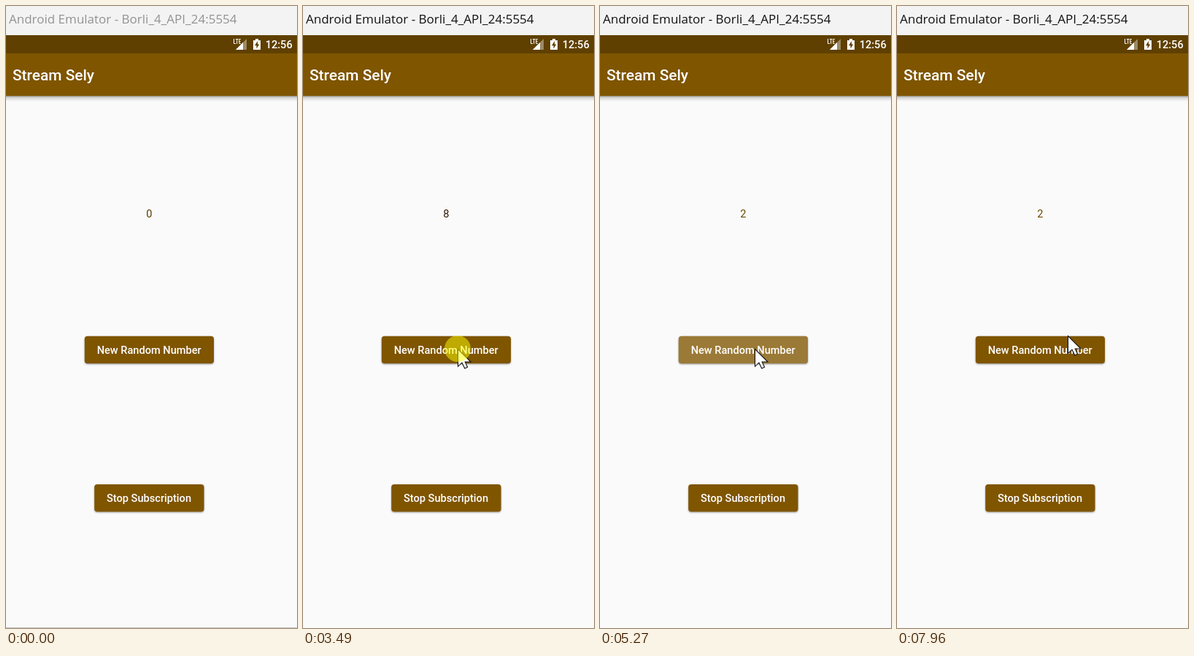
Recreate the animation shown at these times as an HTML page. Size 399 by 853 pixels, loop 8000 ms.

```html
<!DOCTYPE html>
<html lang="en">
<head>
<meta charset="utf-8">
<style>
  html, body { margin: 0; width: 100%; height: 100%; overflow: hidden; background: #fafafa; }
  svg { display: block; width: 100vw; height: 100vh; font-family: Roboto, sans-serif; }
  .label { font-size: 14.6px; font-weight: 500; fill: #fff; text-anchor: middle; }
  .button { fill: #7f5500; filter: drop-shadow(0 1.5px 1.3px rgba(0, 0, 0, .4)); }
</style>
</head>
<body>
<svg viewBox="0 0 399 853">
  <defs>
    <linearGradient id="shade" x2="0" y2="1">
      <stop stop-color="#000" stop-opacity=".36"/>
      <stop offset=".4" stop-color="#000" stop-opacity=".13"/>
      <stop offset="1" stop-color="#000" stop-opacity="0"/>
    </linearGradient>
  </defs>
  <rect width="399" height="853" fill="#fafafa"/>
  <rect id="edge" y="852" width="399" height="1" fill="#c4c4c4"/>

  <rect width="399" height="40" fill="#f3f3f3"/>
  <text id="title" x="4" y="24" font-size="17" font-family="Open Sans, sans-serif">Android Emulator - Borli_4_API_24:5554</text>

  <rect y="40" width="399" height="25" fill="#5f4000"/>
  <path d="M330 45V60H315Z" fill="#9d8b66"/>
  <path d="M325 50V60H315Z" fill="#fff"/>
  <path d="M312.5 45V51.5H315M314.8 45.5H318.6M316.7 45.5V52M321.8 45.5H319.8V51.5H321.8M319.8 48.5H321.5" fill="none" stroke="#fff"/>
  <path d="M339 47H342V45H346V47H349V60H339Z" fill="#fff"/>
  <path d="M345 48L341 54.3H343.5V58.5L347.3 52.4H345Z" fill="#5f4000"/>
  <text class="label" x="374.2" y="58">12:56</text>

  <rect y="123" width="399" height="8" fill="url(#shade)"/>
  <rect y="65" width="399" height="58.4" fill="#7f5500"/>
  <text x="9" y="102" font-size="20.9" font-weight="500" fill="#fff">Stream Sely</text>

  <text id="number" x="196.3" y="290" font-size="14.6" text-anchor="middle"></text>

  <rect class="button" x="107.8" y="452.8" width="177.2" height="37.4" rx="4"/>
  <rect id="flashNew" x="107.8" y="452.8" width="177.2" height="37.4" rx="4" fill="#fff"/>
  <text class="label" x="196.2" y="477">New Random Number</text>

  <rect class="button" x="121.2" y="656" width="150.3" height="37.6" rx="4"/>
  <rect id="flashStop" x="121.2" y="656" width="150.3" height="37.6" rx="4" fill="#fff"/>
  <text class="label" x="196" y="680">Stop Subscription</text>

  <path id="resize" d="M370 667.5L377 661V666H391V661L398 667.5L391 674V669H377V674Z" fill="#fff" stroke="#000"/>
  <path id="cursor" d="M.5 .5V24.3L6 19.2L9.8 27L13.6 25.3L10.2 18H18Z" fill="#fff" stroke="#111" stroke-width="1.1"/>
  <circle id="press" r="18" fill="#ff0" fill-opacity=".5"/>
</svg>
<script>
const $ = id => document.getElementById(id);
const LOOP = 8000, ENTER = 1260, FOCUS = 2080, HOLD = 130;

const moves = [
  { from: ENTER, to: 2010, x: 251, y: 467 },
  { from: 2940, to: 3290, x: 212, y: 470 },
  { from: 5300, to: 5950, x: 187, y: 668 },
  { from: 7560, to: 7960, x: 234, y: 452, bend: 45 }
];
const clicks = [
  { at: FOCUS, value: 0, color: '#5b3d00' },
  { at: 3490, value: 8, color: '#2c1800' },
  { at: 4360, value: 7, color: '#242424' },
  { at: 5130, value: 2, color: '#6b4800' }
];
const stop = { press: 6220, release: 6690 };

const between = (t, a, b) => t >= a && t < b;

// Smooth 0 to 1 as t goes from a to b
function ease(t, a, b) {
  const k = Math.min(1, Math.max(0, (t - a) / (b - a)));
  return k * k * (3 - 2 * k);
}

// Button highlight a given time after a click
const flash = age => .22 * ease(age, 20, 150) * (1 - ease(age, 180, 450));

function pointer(t) {
  let x = 394, y = 417;
  for (const m of moves) {
    const k = ease(t, m.from, m.to);
    x += (m.x - x) * k + (m.bend || 0) * 4 * k * (1 - k);
    y += (m.y - y) * k;
  }
  return `translate(${x} ${y})`;
}

const set = (id, name, value) => $(id).setAttribute(name, value);
const show = (id, on) => set(id, 'visibility', on ? 'visible' : 'hidden');

function draw(t) {
  show('edge', t < FOCUS);
  set('title', 'fill', t < FOCUS ? '#929292' : '#111');
  show('resize', between(t, 310, 380));

  const click = clicks.findLast(c => c.at <= t);
  const { value, color } = click || clicks[0];
  $('number').textContent = value;
  set('number', 'fill', color);
  set('flashNew', 'opacity', click ? flash(t - click.at) : 0);
  set('flashStop', 'opacity', flash(t - stop.release));

  const place = pointer(t);
  set('cursor', 'transform', place);
  set('press', 'transform', place);
  show('cursor', t >= ENTER);
  show('press', between(t, stop.press, stop.release) || click && t < click.at + HOLD);
}

const start = performance.now();
function tick() {
  draw((performance.now() - start) % LOOP);
  requestAnimationFrame(tick);
}
tick();
</script>
</body>
</html>
```
